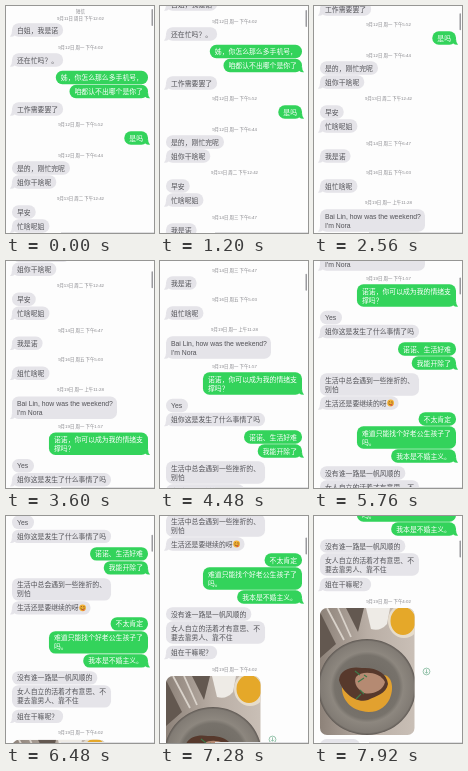
An HTML page that plays this animation: 148 px wide and 227 px high, repeating every 8000 ms.

```html
<!DOCTYPE html>
<html lang="zh-CN">
<head>
<meta charset="utf-8">
<title>Chat</title>
<style>
html, body { margin: 0; width: 100%; height: 100%; overflow: hidden; background: #fdfdfd; }
svg { display: block; width: 148px; height: 227px; }
text { font: 6.85px "Liberation Sans", "Noto Sans CJK SC", "Noto Sans CJK", sans-serif; fill: #525257; }
.me text { fill: #fff; }
.in .bubble { fill: #e5e4e9; }
.me .bubble { fill: #33d35b; }
text.date { font-size: 4.4px; fill: #838388; text-anchor: middle; }
</style>
</head>
<body>
<svg viewBox="0 0 148 227">
  <defs>
    <clipPath id="frame"><rect x="6" y="590" width="94.500" height="127" rx="7"/></clipPath>
    <linearGradient id="cloth">
      <stop offset="0" stop-color="#8d8279"/><stop offset=".5" stop-color="#b9aea5"/>
      <stop offset="1" stop-color="#c9bfb6"/>
    </linearGradient>
    <radialGradient id="plate">
      <stop offset="0" stop-color="#6b665f"/><stop offset=".66" stop-color="#77726b"/>
      <stop offset=".74" stop-color="#8d877f"/><stop offset=".95" stop-color="#817b74"/>
      <stop offset="1" stop-color="#5d5752"/>
    </radialGradient>
  </defs>
  <g id="feed">
    <g id="list"></g>
    <g clip-path="url(#frame)">
      <rect x="6" y="590" width="95" height="127" fill="url(#cloth)"/>
      <path d="M6 594L22 626L6 640zM32 590L44 614L50 590z" fill="#635850"/>
      <path d="M52 590L57 611Q66 614 73 606L76 590z" fill="#eeebe6"/>
      <path d="M13 590L30 622M24 590L37 619" stroke="#d9d2ca" stroke-width="1.800"/>
      <ellipse cx="90" cy="603" rx="16" ry="17" fill="#e6dccb"/>
      <ellipse cx="89" cy="603" rx="12.500" ry="14" fill="#e5a829"/>
      <ellipse cx="53" cy="669" rx="49" ry="48" fill="url(#plate)"/>
      <path d="M28 668C34 656 58 660 68 657C77 656 80 668 77 677C74 690 60 697 48 693C36 691 27 680 28 668z" fill="#e2a12f"/>
      <path d="M25 662C26 651 38 648 48 650C62 649 73 655 74 666C72 676 62 678 54 682C42 686 28 674 25 662z" fill="#57392c"/>
      <path d="M42 659C48 652 66 654 71 664C69 673 58 677 50 675C44 672 39 665 42 659z" fill="#b58a72"/>
      <path d="M41 653l5 4M44 664l6 -4M46 672l4 4M42 681l5 -5M50 657l3 2" stroke="#3e7a4a" stroke-width="1.100"/>
    </g>
    <g fill="none" stroke="#6fae8d" stroke-width=".7">
      <circle cx="112.500" cy="653.500" r="3.400"/>
      <path d="M112.500 651.300v3.800M111 653.800l1.500 1.500l1.500 -1.500"/>
    </g>
    <rect x="6" y="721" width="40" height="13.400" rx="6.500" fill="#e5e4e9"/>
    <g transform="translate(76.600 458)">
      <circle r="3.400" fill="#f3b136"/>
      <path d="M-2 -.8q.8 -1 1.500 0M.6 -.8q.8 -1 1.500 0M-2 .8q2 2 4 0" fill="none" stroke="#5b3a14" stroke-width=".7"/>
      <circle cx="1" cy="2" r=".9" fill="#e25445"/>
    </g>
  </g>
  <rect id="thumb" x="145.500" width="1.500" height="17" rx=".75" fill="#9a9a9e"/>
  <rect x="55" y="226" width="93" height="1" fill="#e0e0e2"/>
</svg>
<script>
const EM = 6.85, PAD = 5, LINE = 9, LEFT = 6, RIGHT = 142;
const list = document.getElementById('list');
const feed = document.getElementById('feed');
const thumb = document.getElementById('thumb');

function add(parent, tag, attrs, text) {
  const el = document.createElementNS('http://www.w3.org/2000/svg', tag);
  for (const key in attrs) el.setAttribute(key, attrs[key]);
  if (text) el.textContent = text;
  return parent.appendChild(el);
}

function date(y, text) {
  add(list, 'text', { class: 'date', x: 74.5, y: y + 1.6 }, text);
}

function bubble(side, y, text, tail, width) {
  const lines = text.split('|');
  const w = (width || Math.max(...lines.map(l => l.length)) * EM) + 2 * PAD;
  const h = 13.4 + (lines.length - 1) * LINE;
  const x = side === 'me' ? RIGHT - w : LEFT;
  const g = add(list, 'g', { class: side });
  add(g, 'rect', { class: 'bubble', x, y: y - h / 2, width: w, height: h, rx: 6.5 });
  if (tail) {
    const edge = side === 'me' ? RIGHT : LEFT, s = side === 'me' ? 1 : -1, b = y + h / 2;
    add(g, 'path', { class: 'bubble',
      d: `M${edge} ${b - 6}q0 4 ${s * 2} 6q${-s * 3} .3 ${-s * 5} -1.500z` });
  }
  lines.forEach((line, i) => add(g, 'text',
    { x: x + PAD, y: y + 2.5 + (i - (lines.length - 1) / 2) * LINE }, line));
}

const them = (...a) => bubble('in', ...a);
const me = (...a) => bubble('me', ...a);

date(5.5, '短信');
date(12, '9月11日 周日 下午12:02');
them(24, '白姐，我是诺', true);
date(41, '9月12日 周一 下午4:02');
them(54, '还在忙吗？。', true);
me(71.5, '姊，你怎么那么多手机号，');
me(85.5, '咱都认不出哪个是你了', true);
them(103, '工作需要罢了', true);
date(118, '9月12日 周一 下午5:52');
me(132, '是吗', true);
date(149, '9月12日 周一 下午6:44');
them(162, '是的，刚忙完呢');
them(176, '姐你干啥呢', true);
date(192, '9月13日 周二 下午12:42');
them(206, '早安');
them(220, '忙啥呢姐', true);
date(237, '9月14日 周三 下午6:47');
them(250, '我是诺', true);
date(266, '9月16日 周五 下午5:03');
them(280, '姐忙啥呢', true);
date(296, '9月19日 周一 上午11:28');
them(314.5, "Bai Lin, how was the weekend?|I'm Nora", true, 95);
date(333, '9月19日 周一 下午1:57');
me(350.5, '诺诺，你可以成为我的情绪支|撑吗？', true);
them(372.5, 'Yes', false, 12);
them(386.5, '姐你这是发生了什么事情了吗', true);
me(404, '诺诺、生活好难');
me(418, '我能开除了', true);
them(439.5, '生活中总会遇到一些挫折的、|别怕');
them(458, '生活还是要继续的呀', true, EM * 10);
me(474, '不太肯定');
me(492.5, '难道只能找个好老公生孩子了|吗。');
me(511, '我本是不婚主义。', true);
them(528, '没有谁一路是一帆风顺的');
them(546.5, '女人自立的活着才有意思、不|要去靠男人、靠不住');
them(566.5, '姐在干嘛呢？', true);
date(583, '9月19日 周一 下午4:02');

// Scroll position: time, offset and speed at a few points, joined by cubics
const keys = [
  [0, 0, .0135], [1200, 26, .037], [2560, 100, .061], [4480, 228, .068],
  [5760, 316, .072], [7280, 430, .093], [7920, 498, .113], [8000, 507, .113]
];

function scrollAt(t) {
  const i = keys.findIndex(k => k[0] > t);
  const [t0, p0, v0] = keys[i - 1], [t1, p1, v1] = keys[i];
  const d = t1 - t0, u = (t - t0) / d, w = 1 - u;
  return w * w * ((1 + 2 * u) * p0 + u * d * v0) + u * u * ((3 - 2 * u) * p1 - w * d * v1);
}

const start = performance.now();

function draw() {
  const t = Math.floor(((performance.now() - start) % 8000) / 80) * 80;
  const y = scrollAt(t);
  feed.setAttribute('transform', `translate(0 ${-y.toFixed(2)})`);
  thumb.setAttribute('y', 3 + y * .043);
  requestAnimationFrame(draw);
}
draw();
</script>
</body>
</html>
```
